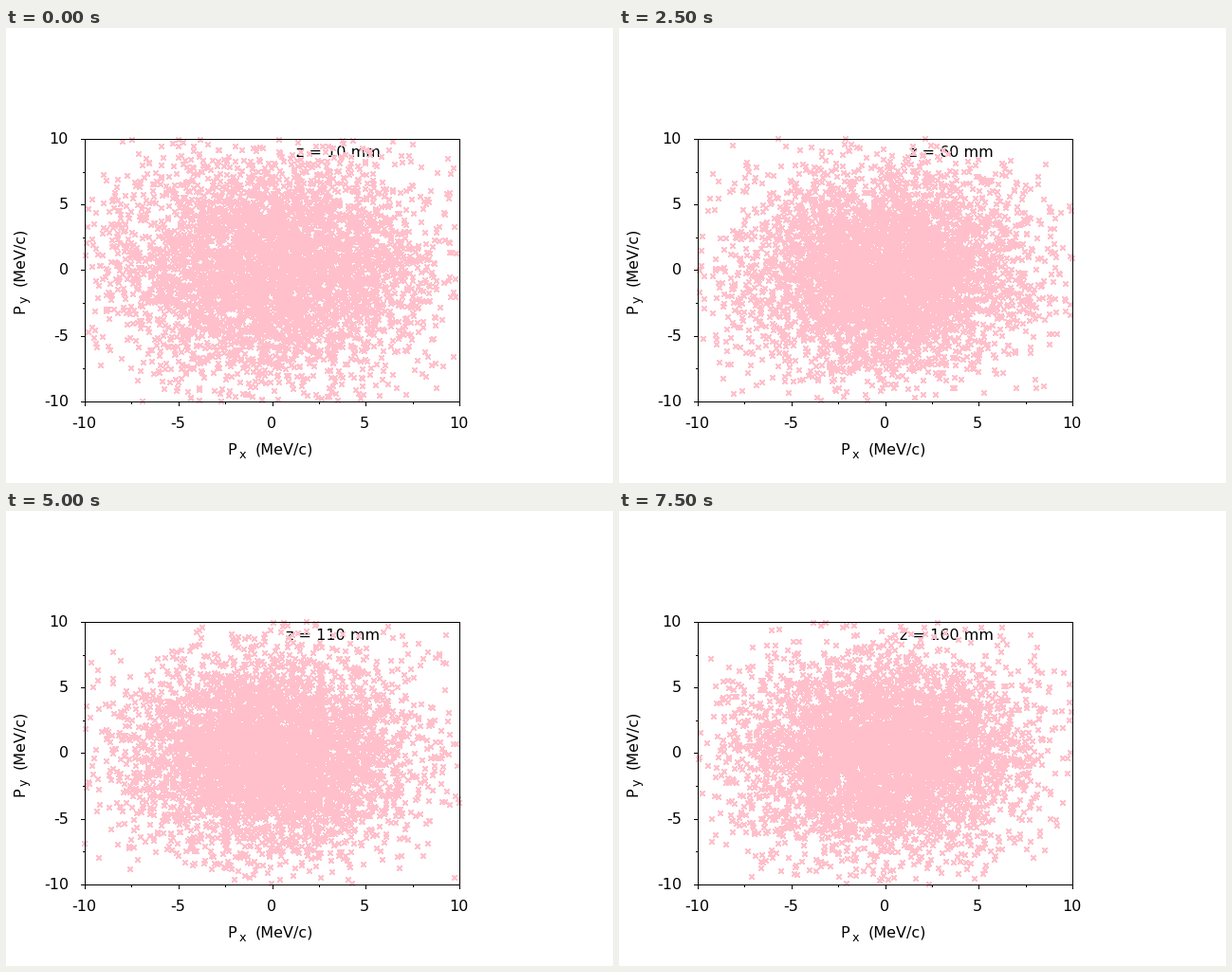
Recreate the animation shown at these times as a matplotlib script. Size 640x480 px, loop 8000 ms.

```python
import numpy as np
import matplotlib.pyplot as plt
from matplotlib.animation import FuncAnimation

W, H = 640, 480
LEFT, RIGHT, TOP, BOTTOM = 83, 478, 117, 394
FRAMES, INTERVAL = 16, 500
COUNT = 5000

plt.rcParams["font.family"] = "DejaVu Sans"
plt.rcParams["axes.unicode_minus"] = False

fig = plt.figure(figsize=(W / 100, H / 100), dpi=100, facecolor="white")
ax = fig.add_axes([0, 0, 1, 1])
ax.set_xlim(0, W)
ax.set_ylim(H, 0)
ax.axis("off")


def px(v):
    return LEFT + (v + 10) / 20 * (RIGHT - LEFT)


def py(v):
    return BOTTOM - (v + 10) / 20 * (BOTTOM - TOP)


def label(x, y, s, size=16, **kw):
    return ax.text(x, y, s, fontsize=size * 0.72, va="baseline", **kw)


def bar(x, y, w, h):
    ax.add_patch(plt.Rectangle((x, y), w, h, fc="black", lw=0,
                               antialiased=False, zorder=5))


# Border, ticks and tick labels
bar(LEFT, TOP, RIGHT - LEFT + 1, 1)
bar(LEFT, BOTTOM, RIGHT - LEFT + 1, 1)
bar(LEFT, TOP, 1, BOTTOM - TOP + 1)
bar(RIGHT, TOP, 1, BOTTOM - TOP + 1)

for v in np.arange(-10, 10.1, 2.5):
    major = v % 5 == 0
    size = 4 if major else 2
    x, y = int(px(v) + 0.5), int(np.ceil(py(v) - 0.5))
    bar(x, BOTTOM, 1, size + 1)
    bar(LEFT - size, y, size, 1)
    if major:
        label(x - 1, 422, f"{v:.0f}", ha="center")
        label(66, y + 5, f"{v:.0f}", ha="right")

# Axis titles with subscripts
label(233.5, 450, "P")
label(245.5, 454, "x", 12.8)
label(263, 450, "(MeV/c)")


def upright(x, y, s, size=16):
    label(x, y, s, size, rotation=90, rotation_mode="anchor")


upright(19, 301, "P")
upright(23, 289.5, "y", 12.8)
upright(19, 272.5, "(MeV/c)")

depth = label(394.6, 136, "", ha="right", zorder=1)

# Cross-shaped marker, six pixels wide
arm = np.abs(np.arange(6) - 2.5)
CROSS = np.argwhere(np.abs(arm[:, None] - arm) <= 1) - 3

cloud = np.zeros((H, W, 4), np.uint8)
cloud[..., :3] = 255, 192, 203
points = ax.imshow(cloud, extent=(0, W, H, 0), interpolation="nearest",
                   aspect="auto", zorder=3)


def update(i):
    rng = np.random.default_rng(100 + i)
    # The beam starts wide and settles
    spread = 3.75 + 0.45 * np.exp(-i / 2)
    x, y = rng.normal(0, spread, (2, COUNT))
    inside = (np.abs(x) <= 10) & (np.abs(y) <= 10)
    cols = np.rint(px(x[inside])).astype(int)
    rows = np.rint(py(y[inside])).astype(int)
    img = cloud.copy()
    for dy, dx in CROSS:
        img[rows + dy, cols + dx, 3] = 255
    points.set_data(img)
    depth.set_text(f"z = {10 * (i + 1)} mm")
    return points, depth


anim = FuncAnimation(fig, update, frames=FRAMES, interval=INTERVAL,
                     repeat=True, repeat_delay=0, blit=False)
plt.show()
```
